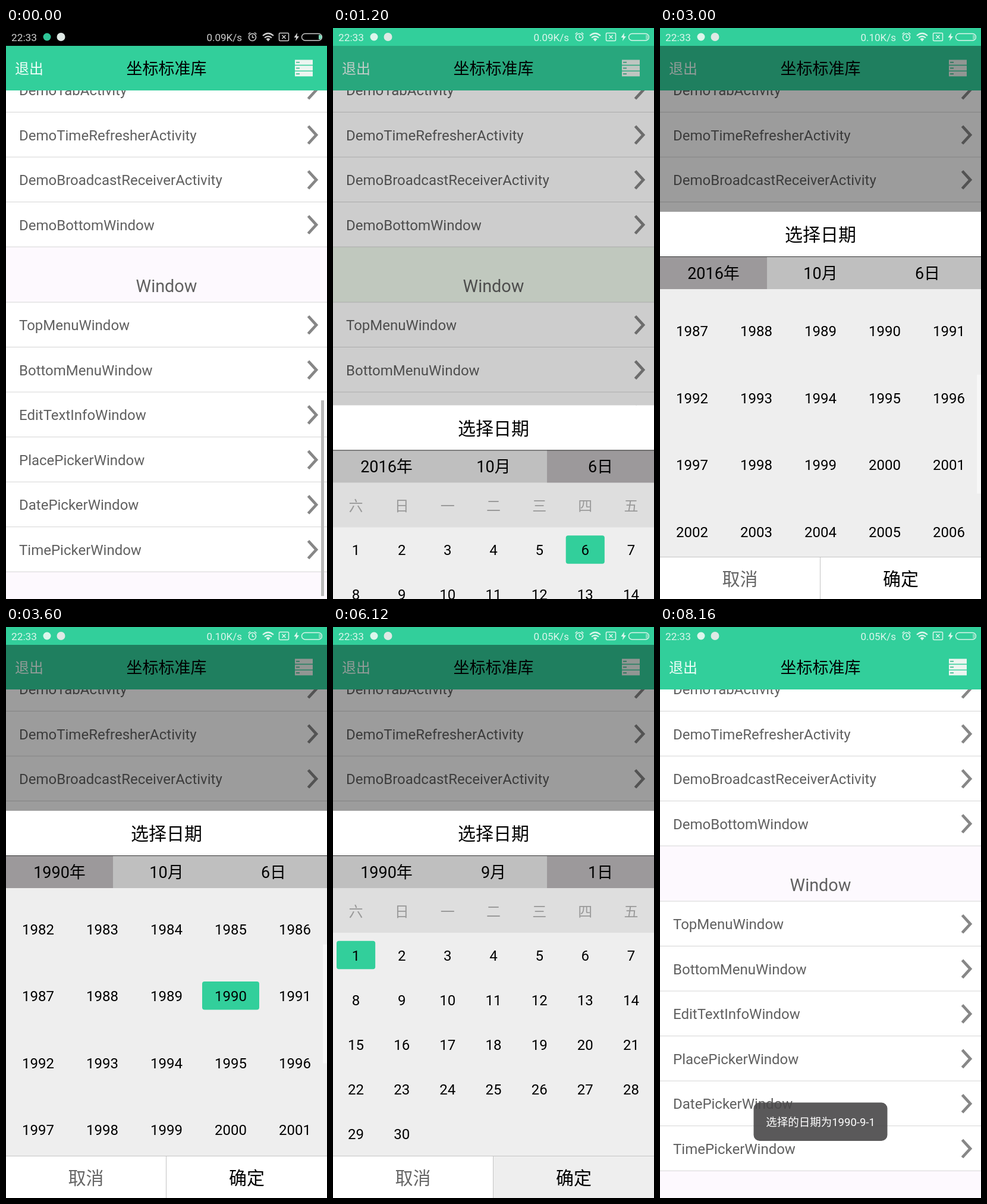
An HTML page for the animation above (8.52 s loop, 540 px wide and 960 px high).

```html
<!DOCTYPE html>
<html lang="zh">
<head>
<meta charset="utf-8">
<style>
  html, body { margin: 0; width: 100%; height: 100%; overflow: hidden; background: #fff; }
  svg { display: block; width: 100%; height: 100%; }
  text { font-family: Roboto, "Noto Sans CJK SC", "Noto Sans CJK", sans-serif; }
</style>
</head>
<body>
<svg id="stage" viewBox="0 0 540 960"></svg>
<script>
const LOOP = 8520, STEP = 120;
const GREEN = '#32cf9b';
const stage = document.getElementById('stage');

const clamp = v => Math.max(0, Math.min(1, v));
const progress = (t, from, to) => clamp((t - from) / (to - from));
const easeInOut = p => p * p * (3 - 2 * p);

const rect = (x, y, w, h, fill, extra = '') =>
  `<rect x="${x}" y="${y}" width="${w}" height="${h}" fill="${fill}" ${extra}/>`;
const text = (x, y, size, fill, str, anchor = 'middle') =>
  `<text x="${x}" y="${y}" font-size="${size}" fill="${fill}" text-anchor="${anchor}">${str}</text>`;
const line = (d, color, width) =>
  `<path d="${d}" fill="none" stroke="${color}" stroke-width="${width}"/>`;

function statusBar(t) {
  const dark = t < 120;
  const ink = dark ? '#cfcfcf' : '#dcf6ec';
  const speed = t < 1320 ? '0.09K/s' : t < 4800 ? '0.10K/s' : '0.05K/s';
  return rect(0, 0, 540, 30, dark ? '#000' : GREEN) +
    text(9, 21.5, 17.3, ink, '22:33', 'start') +
    text(397, 21.5, 17, ink, speed, 'end') +
    `<circle cx="69" cy="15" r="6.5" fill="${dark ? '#2fc597' : ink}"/>` +
    `<circle cx="92.5" cy="15" r="7" fill="#dfe9e5"/>` +
    `<circle cx="414.5" cy="15.5" r="6" fill="none" stroke="${ink}" stroke-width="1.6"/>` +
    line('M414.5 12v4h3M407.5 10.5l3.5-3M421.5 10.5l-3.5-3', ink, 1.5) +
    line('M432 13q9-8 18 0M435 16.500q6-5 12 0', ink, 2.2) +
    `<path d="M437.500 18.500q3.500-3 7 0l-3.500 4z" fill="${ink}"/>` +
    rect(459.5, 8.5, 16, 13, 'none', `rx="1.500" stroke="${ink}" stroke-width="1.500"`) +
    line('M464.500 12l6 6M470.500 12l-6 6', ink, 1.5) +
    `<path d="M490 8l-5.500 8h3.500l-1 6 6-8h-3.500z" fill="${ink}"/>` +
    rect(497.5, 9.5, 34, 11.5, 'none', `rx="5.700" stroke="${ink}" stroke-width="1.400"`) +
    `<path d="M526 11.500h1.500a3.700 3.700 0 0 1 0 7.500h-1.500z" fill="#7bdcba"/>`;
}

function titleBar() {
  const bars = [53.5, 63.3, 73].map(y =>
    rect(486, y, 30, 8.3, '#ecf5f0') + rect(488, y + 3.3, 6, 1.8, '#45bd93')).join('');
  return rect(0, 30, 540, 75, GREEN) +
    text(15, 77, 24, '#f2fffa', '退出', 'start') +
    text(270, 78, 27, '#000', '坐标标准库') + bars;
}

function listRow(name, bottom, pressed) {
  const y = bottom - 37.5;
  return (pressed ? rect(0, bottom - 75, 540, 75, '#eee') : '') +
    text(22, bottom - 28.5, 24, '#606060', name, 'start') +
    line(`M508.500 ${y - 14.5}L522 ${y + .3}L508.500 ${y + 15}`, '#878787', 4.8) +
    rect(0, bottom - .5, 540, 1, '#d5d5d5');
}

function list(t, dimmed) {
  const demos = ['DemoTabActivity', 'DemoTimeRefresherActivity',
    'DemoBroadcastReceiverActivity', 'DemoBottomWindow'];
  const windows = ['TopMenu', 'BottomMenu', 'EditTextInfo', 'PlacePicker', 'DatePicker', 'TimePicker'];
  const section = dimmed ? '#eff9ec' : '#fdf9fe';
  const pressed = t >= 840 && t < 1080;
  const barFade = 1 - progress(t, 0, 360);
  return rect(0, 30, 540, 930, '#fff') +
    rect(0, 368, 540, 93, section) + rect(0, 914, 540, 46, section) +
    demos.map((name, i) => listRow(name, 141.5 + i * 75.5)).join('') +
    rect(0, 460.5, 540, 1, '#d5d5d5') +
    text(270, 444, 28.8, '#606060', 'Window') +
    windows.map((name, i) =>
      listRow(name + 'Window', 536.5 + i * 75.55, pressed && name === 'DatePicker')).join('') +
    rect(530, 626, 5, 329, '#b9b9b9', `opacity="${barFade}"`);
}

// Numbers first..last in equal cells, with a green button behind the chosen one.
function grid({ first, last, columns, top, rowHeight, chosen, scroll = 0 }) {
  const width = 540 / columns;
  let out = '';
  for (let n = first; n <= last; n++) {
    const i = n - first;
    const x = (i % columns) * width;
    const y = top + (Math.floor(i / columns) + .5) * rowHeight - scroll + .3;
    if (y < 380 || y > 930) continue;
    if (n === chosen) out += rect(x + 6, y - 24, width - 12, 47.5, GREEN, 'rx="4"');
    out += text(x + width / 2, y + 9, 24, '#000', n);
  }
  return out;
}

function yearGrid(t, year) {
  const scroll = 562.5 - 349.5 * easeInOut(progress(t, 2400, 3360));
  return rect(533, 439 + scroll * 450 / 1012.5, 7, 200, '#f7f7f7') +
    grid({ first: 1972, last: 2016, columns: 5, top: 439, rowHeight: 112.5, chosen: year, scroll });
}

function dayGrid(year, month, day) {
  const start = new Date(year, month - 1, 1).getDay();
  const last = new Date(year, month, 0).getDate();
  let names = '';
  for (let i = 0; i < 7; i++) {
    names += text((i + .5) * 540 / 7, 486.5, 24, '#999', '日一二三四五六'[(start + i) % 7]);
  }
  return rect(0, 439, 540, 75, '#dedede') + names +
    grid({ first: 1, last, columns: 7, top: 514, rowHeight: 75, chosen: day });
}

function picker(t) {
  const year = t < 3480 ? 2016 : 1990;
  const month = t < 4200 ? 10 : 9;
  const day = t < 5160 ? 6 : 1;
  const tab = t < 2040 ? 2 : t < 3960 ? 0 : t < 4800 ? 1 : 2;
  const labels = [year + '年', month + '月', day + '日'];
  const body = [
    () => yearGrid(t, year),
    () => grid({ first: 1, last: 12, columns: 4, top: 439, rowHeight: 150, chosen: month }),
    () => dayGrid(year, month, day)
  ][tab]();
  return rect(0, 309, 540, 651, '#eee') + body +
    rect(0, 309, 540, 75, '#fff') +
    text(270, 358, 30, '#000', '选择日期') +
    labels.map((label, i) =>
      rect(i * 180, 384, 180, 55, i === tab ? '#9c999b' : '#bfbfbf') +
      text(i * 180 + 90, 421.7, 27, '#000', label)).join('') +
    rect(0, 384, 540, 1, '#333') +
    rect(0, 889, 270, 71, '#fff') +
    rect(270, 889, 270, 71, t >= 6120 ? '#eee' : '#fff') +
    rect(0, 889, 540, 1, '#c4c4c4') + rect(269, 889, 1, 71, '#c4c4c4') +
    text(134.5, 936.7, 30, '#666', '取消') +
    text(405, 936.7, 30, '#000', '确定');
}

function toast(t) {
  return `<g opacity="${progress(t, 7440, 7920)}">` +
    rect(157.5, 799.5, 225, 64.5, '#494749', 'rx="10" opacity=".9"') +
    text(270, 838.7, 18.5, '#fff', '选择的日期为1990-9-1') + '</g>';
}

function draw(t) {
  const dim = .39 * progress(t, 1080, 1320) * (1 - progress(t, 7320, 7560));
  const enter = easeInOut(progress(t, 1080, 1320));
  const leave = easeInOut(progress(t, 6960, 7320));
  const slide = 651 * (1 - enter + leave);
  stage.innerHTML = list(t, dim > 0) + titleBar() +
    (dim ? rect(0, 30, 540, 930, '#000', `opacity="${dim}"`) : '') +
    (slide < 651 ? `<g transform="translate(0 ${t < 7080 && enter === 1 ? 0 : slide})">${picker(t)}</g>` : '') +
    statusBar(t) + (t > 7440 ? toast(t) : '');
}

let shown = -1;
const origin = performance.now();
function tick() {
  const t = Math.floor(((performance.now() - origin) % LOOP) / STEP) * STEP;
  if (t !== shown) draw(shown = t);
  requestAnimationFrame(tick);
}
tick();
</script>
</body>
</html>
```
